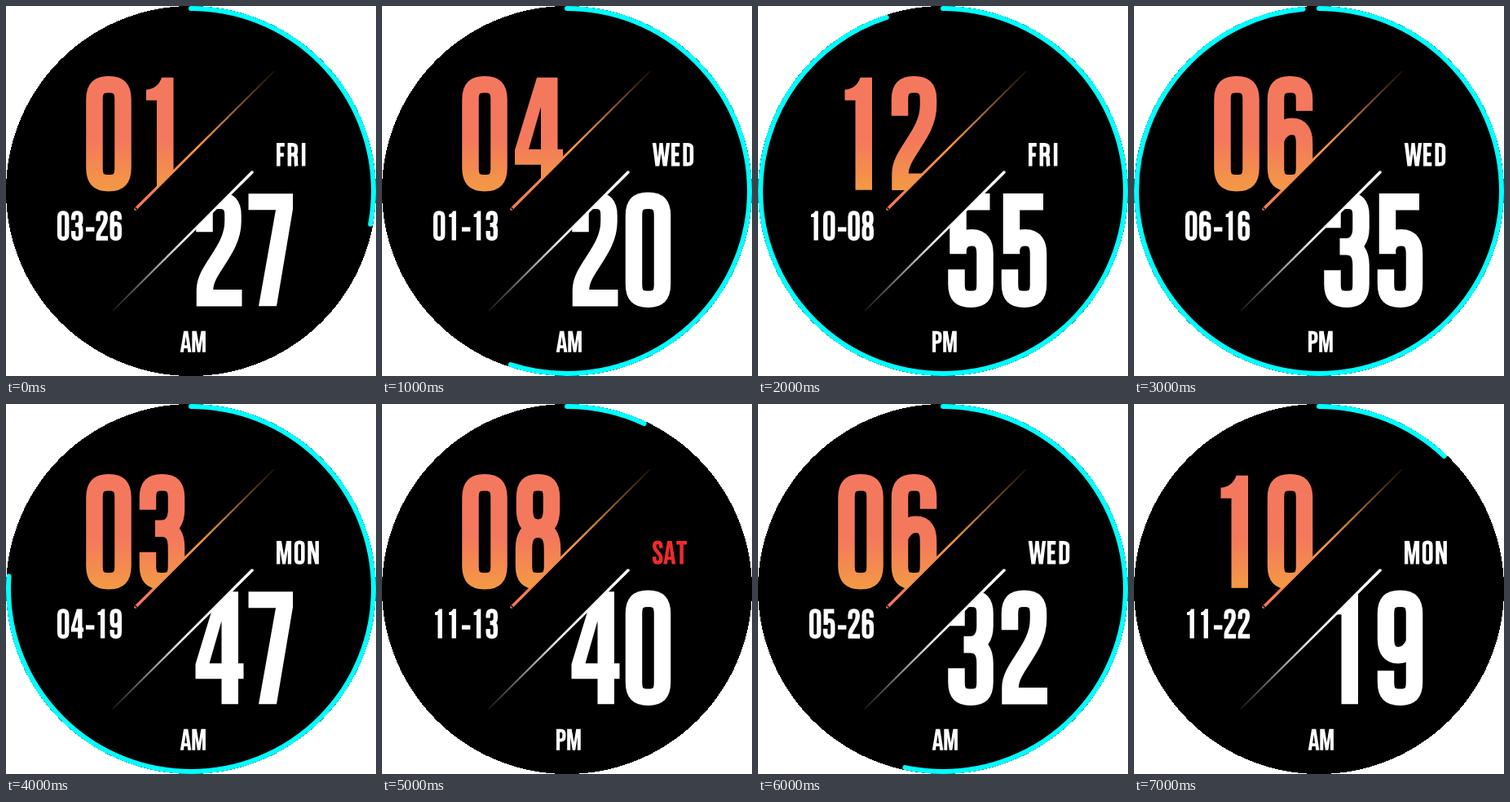
These frames come from a looping animation (454x454 px, 8000 ms). An HTML page with a canvas:

```html
<!DOCTYPE html>
<html lang="en">
<head>
<meta charset="utf-8">
<title>Watch face</title>
<style>
html, body { margin: 0; width: 100%; height: 100%; overflow: hidden; background: #fff; }
canvas { display: block; }
</style>
</head>
<body>
<canvas id="face" width="454" height="454" role="img"></canvas>
<script>
const canvas = document.getElementById('face');
const ctx = canvas.getContext('2d');

// Condensed lettering on a 138-unit cap height: [path, advance].
const FILLED = '147AMNW';
const DIGIT = 65.5;
const shapes = {
  0: ['M10 27C10 14 15 8.5 27.5 8.5S45 14 45 27V111C45 124 40 129.5 27.5 129.5S10 124 10 111Z', DIGIT],
  1: ['M21 138V28H8V15C18 14 24 9 27 0H41.5V138Z', DIGIT],
  2: ['M10 47V27C10 14 15 8.5 27.5 8.5S45 14 45 27V34C45 70 10.5 92 10.5 118V128H56', DIGIT],
  3: ['M10 42V27C10 14 15 8.5 27.5 8.5S45 14 45 27V42C45 56 39 65 27 65H19M27 65C40 65 45 74 45 88V111C45 124 40 129.5 27.5 129.5S10 124 10 111V94', DIGIT],
  4: ['M51.5 0V88H58V107H51.5V138H31V107H-1V89L26 0ZM31 88V36L16 88Z', DIGIT],
  5: ['M51 10H12V74M12 68C14 58 20 54 29 54C41 54 45 62 45 74V111C45 124 40 129.5 27.5 129.5S10 124 10 111V93', DIGIT],
  6: ['M45 41V27C45 14 40 8.5 27.5 8.5S10 14 10 27V111C10 124 15 129.5 27.5 129.5S45 124 45 111V80C45 67 40 60 30 60C20 60 14 66 10 76', DIGIT],
  7: ['M-1.5 0H53V19L33 138H11L32 20H-1.5Z', DIGIT],
  8: ['M27.5 8.5C15 8.5 11 14 11 27V42C11 56 16 64 27.5 64S44 56 44 42V27C44 14 40 8.5 27.5 8.5ZM27.5 66C15 66 10 75 10 90V111C10 124 15 129.5 27.5 129.5S45 124 45 111V90C45 75 40 66 27.5 66Z', DIGIT],
  9: ['M10 97V111C10 124 15 129.5 27.5 129.5S45 124 45 111V27C45 14 40 8.5 27.5 8.5S10 14 10 27V58C10 71 15 78 25 78C35 78 41 72 45 62', DIGIT],
  '-': ['M3 86H43', 51],
  A: ['M-1 138L22 0H49L71 138H49L46 113H24L21 138ZM27 93H43L35 36Z', 76],
  D: ['M11 11V127H26C45 127 51 120 51 106V32C51 18 45 11 26 11Z', 78],
  E: ['M50 11H11V127H50M11 68H45', 70],
  F: ['M48 11H11V138M11 70H43', 66],
  I: ['M11 0V138', 36],
  M: ['M0 138V0H29L44 88L59 0H88V138H67V52L53 138H35L21 52V138Z', 106],
  N: ['M0 138V0H24L45 74V0H66V138H44L21 58V138Z', 82],
  O: ['M11 28C11 14 17 9 31 9S51 14 51 28V110C51 124 45 129 31 129S11 124 11 110Z', 80],
  P: ['M11 138V11H28C44 11 50 18 50 32V50C50 65 44 73 28 73H11', 70],
  R: ['M11 138V11H28C44 11 50 17 50 30V48C50 62 44 69 30 69H11M32 69C46 70 50 78 50 92V118C50 128 51 132 53 138', 84],
  S: ['M50 42V30C50 15 43 9 30 9S11 15 11 30C11 64 50 68 50 108C50 123 43 129 30 129S11 123 11 108V94', 66],
  T: ['M0 11H62M31 11V138', 64],
  W: ['M-1 0H21L32 88L41 0H61L71 88L82 0H103L86 138H62L51 62L40 138H17Z', 112]
};
const glyphs = {};
for (const [char, [path, advance]] of Object.entries(shapes))
  glyphs[char] = { path: new Path2D(path), advance };

// hour, minute, month-day, weekday, half of day, ring angle in degrees
const states = [
  ['01', '27', '03-26', 'FRI', 'AM', 100.5],
  ['04', '20', '01-13', 'WED', 'AM', 198],
  ['12', '55', '10-08', 'FRI', 'PM', 342],
  ['06', '35', '06-16', 'WED', 'PM', 355],
  ['03', '47', '04-19', 'MON', 'AM', 274],
  ['08', '40', '11-13', 'SAT', 'PM', 25],
  ['06', '32', '05-26', 'WED', 'AM', 192],
  ['10', '19', '11-22', 'MON', 'AM', 43.3]
];

function gradient(x1, y1, x2, y2, stops) {
  const g = ctx.createLinearGradient(x1, y1, x2, y2);
  for (const [at, color] of stops) g.addColorStop(at, color);
  return g;
}

const hourLine = gradient(159, 249, 329, 80,
  [[0, '#f4785c'], [0.45, '#f09642'], [0.65, '#b87430'], [1, '#1c1107']]);
const minuteLine = gradient(302, 204, 131, 374,
  [[0, '#fff'], [0.5, '#eee'], [1, '#181818']]);
const hourFill = gradient(0, 0, 0, 139,
  [[0, '#f4785e'], [0.55, '#f4785c'], [1, '#f39a44']]);

function write(text, x, y, height, color, weight) {
  ctx.save();
  ctx.translate(x, y);
  ctx.scale(height / 138, height / 138);
  ctx.fillStyle = ctx.strokeStyle = color;
  ctx.lineWidth = weight;
  for (const char of text) {
    const { path, advance } = glyphs[char];
    if (FILLED.includes(char)) ctx.fill(path, 'evenodd');
    else ctx.stroke(path);
    ctx.translate(advance, 0);
  }
  ctx.restore();
}

// Keeps drawing on one side of the diagonal x + y = sum.
function beside(sum, far, draw) {
  ctx.save();
  ctx.beginPath();
  ctx.moveTo(sum, 0);
  ctx.lineTo(0, sum);
  ctx.lineTo(far, far);
  ctx.clip();
  draw();
  ctx.restore();
}

// A diagonal stroke that gets thinner towards its dark end.
function taper(x1, y1, x2, y2, color) {
  const wide = 1.3, thin = 0.6;
  ctx.fillStyle = color;
  ctx.beginPath();
  ctx.arc(x1, y1, wide * Math.SQRT2, 0, 2 * Math.PI);
  ctx.moveTo(x1 - wide, y1 - wide);
  ctx.lineTo(x1 + wide, y1 + wide);
  ctx.lineTo(x2 + thin, y2 + thin);
  ctx.lineTo(x2 - thin, y2 - thin);
  ctx.fill('nonzero');
}

// Disc with a hard, unsmoothed edge.
function disc(radius) {
  ctx.fillStyle = '#000';
  for (let y = 0; y < 2 * radius; y++) {
    const half = Math.round(Math.sqrt(radius ** 2 - (y + 0.5 - radius) ** 2));
    ctx.fillRect(radius - half, y, 2 * half, 1);
  }
}

function ring(angle) {
  ctx.save();
  ctx.globalCompositeOperation = 'source-atop';
  ctx.lineCap = 'round';
  ctx.strokeStyle = '#0ff';
  ctx.lineWidth = 6;
  ctx.beginPath();
  ctx.arc(227, 227, 224, -Math.PI / 2, (angle - 90) * Math.PI / 180);
  ctx.stroke();
  ctx.restore();
}

function render([hour, minute, date, day, half, angle]) {
  ctx.clearRect(0, 0, 454, 454);
  disc(227);
  ring(angle);
  taper(159, 249, 329, 80, hourLine);
  taper(302, 204, 131, 374, minuteLine);
  beside(409, 0, () => write(hour, 98.5, 87.8, 138, hourFill, 20.5));
  beside(506, 454, () => write(minute, 233.5, 230.3, 138, '#fff', 20.5));
  write(date, 63, 251.6, 36, '#fff', 20.5);
  write(day, 332, 168, 28.4, day === 'SAT' ? '#ee2b2f' : '#fff', 22);
  write(half, 214, 398.7, 26, '#fff', 22);
}

let shown = -1;
function tick() {
  const index = Math.floor(performance.now() / 1000) % states.length;
  if (index !== shown) {
    shown = index;
    render(states[index]);
    const [hour, minute, date, day, half] = states[index];
    canvas.setAttribute('aria-label', `${hour}:${minute} ${half}, ${day} ${date}`);
  }
  requestAnimationFrame(tick);
}
tick();
</script>
</body>
</html>
```
